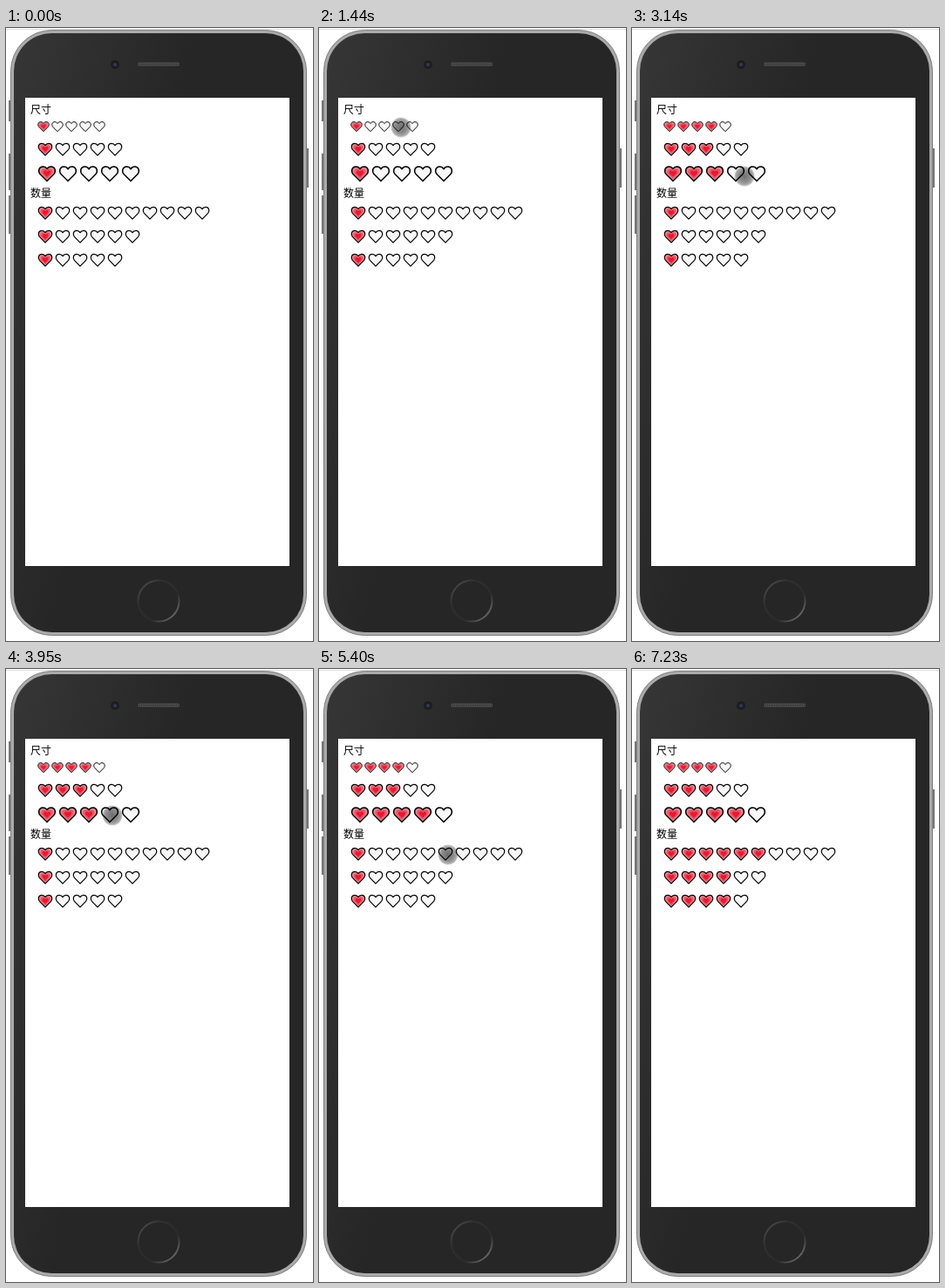
These frames come from a looping animation (352x703 px, 8080 ms). An HTML page:

```html
<!DOCTYPE html>
<html lang="zh">
<head>
<meta charset="utf-8">
<title>Heart rating</title>
<style>
  html, body { margin: 0; width: 100%; height: 100%; overflow: hidden; background: #fff; }
  svg { display: block; }
  text { font: 12px "Noto Sans CJK SC", "Noto Sans CJK", "Noto Sans CJK JP", sans-serif; }
</style>
</head>
<body>
<svg id="stage" width="352" height="703" viewBox="0 0 352 703">
  <defs>
    <path id="shape" d="M0 8.6 L-8 .4 C-10.6 -2.6 -9.3 -8 -4.8 -8 C-2.6 -8 -1 -7 0 -5.2 C1 -7 2.6 -8 4.8 -8 C9.3 -8 10.6 -2.6 8 .4 Z"/>
    <g id="empty">
      <use href="#shape" fill="#f7f7f7" stroke="#000" stroke-width="1.5" stroke-linejoin="round"/>
    </g>
    <g id="full">
      <use href="#shape" fill="#ef8b96" stroke="#000" stroke-width="1.5" stroke-linejoin="round"/>
      <use href="#shape" fill="#ea5566" transform="scale(.72)"/>
      <use href="#shape" fill="#ee1730" transform="scale(.44)"/>
    </g>
    <radialGradient id="touch">
      <stop offset="0" stop-opacity=".56"/>
      <stop offset=".6" stop-opacity=".44"/>
      <stop offset=".85" stop-opacity=".33"/>
      <stop offset="1" stop-opacity=".15"/>
    </radialGradient>
    <linearGradient id="body" x2=".5" y2=".25">
      <stop offset="0" stop-color="#363636"/>
      <stop offset="1" stop-color="#262626"/>
    </linearGradient>
    <linearGradient id="ring" x2="1" y2="1">
      <stop offset="0" stop-color="#555"/>
      <stop offset=".3" stop-color="#303030"/>
      <stop offset=".65" stop-color="#2b2b2b"/>
      <stop offset="1" stop-color="#858585"/>
    </linearGradient>
    <pattern id="mesh" width="2" height="2" patternUnits="userSpaceOnUse">
      <rect width="2" height="2" fill="#3c3c3c"/>
      <rect width="1" height="1" fill="#5c5c5c"/>
    </pattern>
  </defs>

  <path d="M0 1.5H352" stroke="#e0e0e0"/>
  <g fill="#777">
    <rect x="3" y="83" width="3" height="24"/>
    <rect x="3" y="144" width="3" height="42"/>
    <rect x="3" y="192" width="3" height="44"/>
    <rect x="344" y="138" width="3" height="45"/>
  </g>
  <rect x="5.5" y="2.5" width="339" height="694" rx="47" fill="#aaa" stroke="#808080"/>
  <rect x="9" y="6" width="332" height="687" rx="43.5" fill="url(#body)"/>
  <circle cx="125" cy="42" r="5" fill="#1d1d1f"/>
  <circle cx="125" cy="42" r="2" fill="#34385a"/>
  <rect x="151" y="39" width="48" height="5" rx="2.5" fill="url(#mesh)"/>
  <circle cx="175" cy="657" r="23.5" fill="none" stroke="url(#ring)" stroke-width="2"/>
  <rect x="22" y="80" width="303" height="537" fill="#fff"/>
  <text x="28" y="98">尺寸</text>
  <text x="28" y="194">数量</text>
  <g id="rows"></g>
  <rect id="tap" fill="#33b5e5" fill-opacity=".45"/>
  <circle id="cursor" r="11.5" fill="url(#touch)"/>
</svg>
<script>
const LOOP = 8080, STEP = 140, REST = 150, SHOW = 500, HIDE = 7230, LEFT = 35;
const $ = id => document.getElementById(id);

const row = (y, size, count) => ({ y, size, count });
const rows = [
  row(113, 16, 5), row(139, 20, 5), row(167, 24, 5),
  row(212, 20, 10), row(239, 20, 6), row(266, 20, 5)
];

const move = (time, x, y) => ({ time, x, y });

// A tap sets a row's value; the pointer rests on that heart beforehand.
function tap(time, index, value) {
  const { y, size } = rows[index];
  return { time, index, value, x: LEFT + size * (value - .5) + 3, y: y + 1 };
}

const story = [
  move(SHOW, 267, 253), move(780, 127, 162), tap(1590, 0, 4),
  tap(2280, 1, 3), tap(2710, 2, 3),
  move(3140, 129, 170), move(3530, 144, 172), move(3800, 70, 172), tap(4070, 2, 4),
  move(4670, 118, 235), move(4960, 98, 330), tap(5520, 3, 6),
  tap(5890, 4, 4), move(6150, 97, 267), tap(6450, 5, 4), move(7100, 249, 653)
];
const taps = story.filter(s => s.value);
const stops = story.flatMap(s => s.value ? [{ ...s, time: s.time - REST }, s] : [s]);

function setAttrs(el, attrs) {
  for (const name in attrs) el.setAttribute(name, attrs[name]);
}

const hearts = rows.map(({ y, size, count }) =>
  Array.from({ length: count }, (_, i) => {
    const heart = document.createElementNS("http://www.w3.org/2000/svg", "use");
    const x = LEFT + size * (i + .5);
    setAttrs(heart, { transform: `translate(${x} ${y}) scale(${size / 24})` });
    return $("rows").appendChild(heart);
  }));

// The pointer advances in steps, as in a screen recording.
function pointAt(t) {
  const from = stops.findLast(s => s.time <= t);
  const to = stops.find(s => s.time > t) || from;
  const elapsed = Math.floor((t - from.time) / STEP) * STEP;
  const k = elapsed / (to.time - from.time || 1);
  const ease = 1 - (1 - k) ** 1.5;
  return to === from ? { cx: from.x, cy: from.y } : {
    cx: from.x + (to.x - from.x) * ease,
    cy: from.y + (to.y - from.y) * ease
  };
}

function draw(t) {
  const done = taps.filter(s => s.time <= t);
  hearts.forEach((line, r) => {
    const value = done.findLast(s => s.index === r)?.value ?? 1;
    line.forEach((heart, i) => setAttrs(heart, { href: i < value ? "#full" : "#empty" }));
  });

  const last = done.at(-1);
  const lit = last && t - last.time < STEP;
  $("tap").style.display = lit ? "" : "none";
  if (lit) {
    const { y, size } = rows[last.index];
    setAttrs($("tap"), {
      x: LEFT + size * (last.value - 1) + 1, y: y - size / 2,
      width: size + 1, height: size - 2
    });
  }

  const shown = t >= SHOW && t < HIDE;
  $("cursor").style.display = shown ? "" : "none";
  if (shown) setAttrs($("cursor"), pointAt(t));
}

function tick() {
  draw(performance.now() % LOOP);
  requestAnimationFrame(tick);
}
tick();
</script>
</body>
</html>
```
